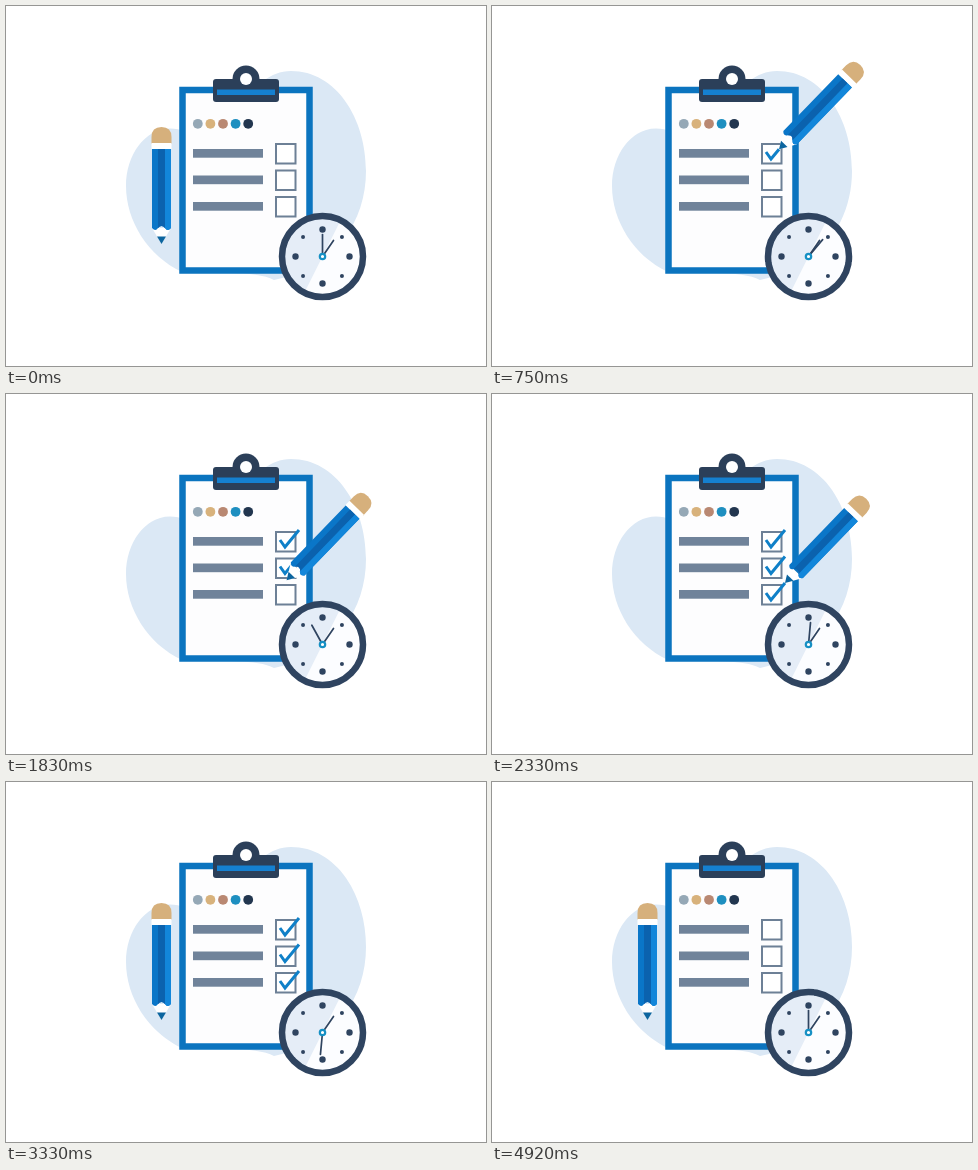
An HTML page for the animation above (5000 ms loop, 480 by 360 pixels).

```html
<!DOCTYPE html>
<html lang="en">
<head>
<meta charset="utf-8">
<title>Checklist</title>
<style>
  html, body { margin: 0; width: 100%; height: 100%; overflow: hidden; background: #fff; }
  svg { display: block; width: 100vw; height: 100vh; }
</style>
</head>
<body>
<svg viewBox="0 0 480 360">
  <path fill="#dbe8f5" d="M120 180C120 142 148 112 180 126C232 132 240 65 285 65C330 65 360 112 360 165C360 215 330 262 268 274C250 264 200 268 176 266C142 250 120 215 120 180Z"/>

  <g id="board">
    <rect x="176.5" y="84" width="127" height="180.5" fill="#fdfdfe" stroke="#0b74bf" stroke-width="6.5"/>
    <circle cx="240" cy="73" r="13.5" fill="#2b3f59"/>
    <rect x="207" y="73" width="66" height="23" rx="3" fill="#2b3f59"/>
    <circle cx="240" cy="73" r="6" fill="#fff"/>
    <rect x="211" y="83.5" width="58" height="5.5" fill="#1580d0"/>
  </g>
  <g id="dots"></g>
  <g id="rows"></g>

  <g id="clock" transform="translate(316.5 250.5)">
    <circle r="41" fill="#fcfdff"/>
    <path fill="#e5edf7" d="M18 -36A40 40 0 1 0 -18 36Z"/>
    <circle r="40.5" fill="none" stroke="#2f4460" stroke-width="6.5"/>
    <g id="marks" fill="#2f4460"></g>
    <g stroke="#2f4460" stroke-width="1.7" stroke-linecap="round">
      <path d="M0 0L11 -16"/>
      <path id="minute" d="M0 0V-22"/>
    </g>
    <circle r="2.7" fill="#fff" stroke="#1690c4" stroke-width="2.2"/>
  </g>

  <g id="pencil">
    <path fill="#d6b07c" d="M-10 -100V-107Q-10 -117 0 -117T10 -107V-100Z"/>
    <path fill="#fff" d="M-10 -101H10V-95H-10ZM-9.5 -16H9.5L0 0Z"/>
    <path fill="#0a76c8" d="M-9.5 -95H9.5V-16Q6 -12 3.5 -16Q0 -20 -3.5 -16Q-6 -12 -9.5 -16Z"/>
    <path fill="#0b62ae" d="M-3.5 -95H3.5V-16Q0 -20 -3.5 -16Z"/>
    <path fill="#1286da" d="M3.5 -95H9.5V-16Q6 -12 3.5 -16Z"/>
    <path fill="#0c659f" d="M-4.5 -7.5H4.5L0 0Z"/>
  </g>
</svg>
<script>
const LOOP = 5000, STEP = LOOP / 60;
const $ = id => document.getElementById(id);
const clamp = v => Math.min(1, Math.max(0, v));
const smooth = p => p * p * (3 - 2 * p);

function add(parent, tag, attrs) {
  const el = document.createElementNS('http://www.w3.org/2000/svg', tag);
  for (const k in attrs) el.setAttribute(k, attrs[k]);
  return parent.appendChild(el);
}

['#95a8b6', '#d8b27c', '#b98872', '#1e8fc0', '#22364f'].forEach((fill, i) =>
  add($('dots'), 'circle', { cx: 191.8 + i * 12.6, cy: 117.8, r: 4.9, fill }));

for (let i = 0; i < 8; i++) {
  const a = i * Math.PI / 4, r = i % 2 ? 27.5 : 27;
  add($('marks'), 'circle', { cx: r * Math.cos(a), cy: r * Math.sin(a), r: i % 2 ? 2 : 3.2 });
}

// Each check: start time, end time; the corner is reached at 28 % of the stroke.
const CORNER = 0.28, GAP = 26.5, TILT = 44;
const strokes = [[500, 860], [1280, 1640], [1960, 2320]];
const checks = strokes.map(([from, to], i) => {
  const y = i * GAP;
  add($('rows'), 'rect', { x: 187, y: 143 + y, width: 70, height: 8.7, fill: '#70839a' });
  add($('rows'), 'rect', { x: 270, y: 138 + y, width: 19.5, height: 19.5,
    fill: '#fff', stroke: '#6d8096', 'stroke-width': 2 });
  const el = add($('rows'), 'path', { d: `M274 ${146 + y}l5 7l14 -17`, pathLength: 1, fill: 'none',
    stroke: '#0f80c8', 'stroke-width': 3, 'stroke-dasharray': '1 2' });
  return { el, from, to };
});

// Pencil keys: time, tip x, tip y, tilt
const home = [155.5, 238, 0];
const pencilKeys = [[0, ...home], [80, ...home]];
strokes.forEach(([from, to], i) => {
  const y = i * GAP;
  pencilKeys.push([from, 274, 146 + y, TILT],
    [from + (to - from) * CORNER, 279, 153 + y, TILT],
    [to, 293, 136 + y, TILT]);
});
pencilKeys.push([2345, 293, 189, TILT], [2880, ...home], [LOOP, ...home]);

function pencilAt(t) {
  const i = Math.max(1, pencilKeys.findIndex(k => k[0] > t));
  const a = pencilKeys[i - 1], b = pencilKeys[i];
  const p = (t - a[0]) / (b[0] - a[0]);
  const writing = strokes.some(([from, to]) => t >= from && t < to);
  const e = writing ? p : smooth(p);
  return a.map((v, n) => v + (b[n] - v) * e);
}

// Minute hand: time, angle, joined by a monotone curve
const hand = [[0, 0], [250, 2], [750, 40], [1330, 187], [1900, 340], [2330, 365],
  [2920, 425], [3380, 560], [3830, 700], [4300, 720], [LOOP, 720]];
const slope = i => (hand[i + 1][1] - hand[i][1]) / (hand[i + 1][0] - hand[i][0]);
function tangent(i) {
  if (i === 0 || i === hand.length - 1) return 0;
  const a = slope(i - 1), b = slope(i);
  return a * b > 0 ? 2 * a * b / (a + b) : 0;
}
function handAt(t) {
  const i = hand.findIndex(k => k[0] > t) - 1;
  const [t0, a] = hand[i], [t1, b] = hand[i + 1];
  const d = t1 - t0, p = (t - t0) / d, q = 1 - p;
  return a + (b - a) * smooth(p) + d * p * q * (q * tangent(i) - p * tangent(i + 1));
}

function draw(t) {
  const [, x, y, tilt] = pencilAt(t);
  $('pencil').setAttribute('transform', `translate(${x} ${y}) rotate(${tilt})`);
  $('minute').setAttribute('transform', `rotate(${handAt(t)})`);
  const fade = 1 - clamp((t - 3350) / 250);
  for (const { el, from, to } of checks) {
    const p = clamp((t - from) / (to - from));
    el.setAttribute('stroke-dashoffset', 1 - p);
    el.setAttribute('opacity', p > 0 ? fade : 0);
  }
}

const start = performance.now();
function tick() {
  const t = (performance.now() - start) % LOOP;
  draw(Math.floor((t + 5) / STEP) % 60 * STEP);
  requestAnimationFrame(tick);
}
tick();
</script>
</body>
</html>
```
